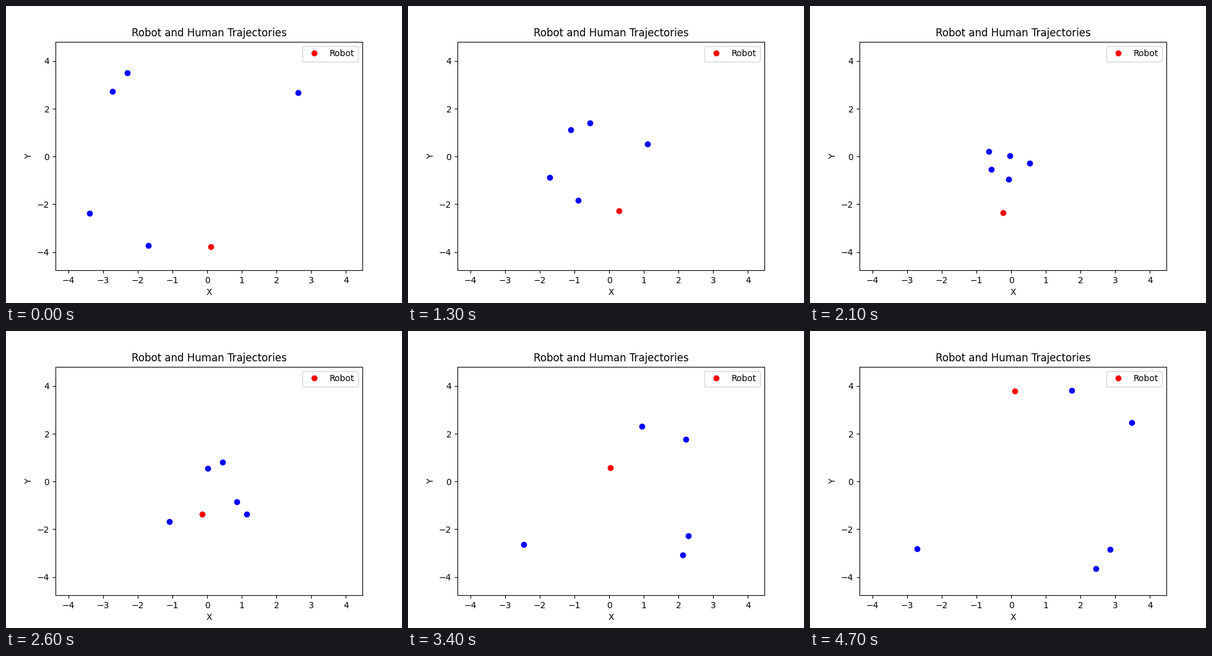
Animation of 640x480 px, one loop 4800 ms. Source, as a matplotlib script:

```python
import matplotlib.pyplot as plt
import numpy as np
from matplotlib.animation import FuncAnimation

FRAMES = 48
STEP = 0.25         # longest stride in one frame
NEAR, MEET = 8, 21  # frames at which humans pass their two key points

# Each human: a point on the way in, a point in the crowd, the goal.
# Everyone starts opposite the goal.
HUMANS = np.array([
    [(-1.235, 2.44), (0.53, -0.275), (2.445, -3.65)],
    [(-1.77, 1.82), (-0.03, 0.02), (2.86, -2.85)],
    [(1.83, 1.46), (-0.075, -0.95), (-2.72, -2.82)],
    [(-2.375, -1.545), (-0.645, 0.215), (3.51, 2.487)],
    [(-1.11, -2.635), (-0.57, -0.55), (1.768, 3.863)],
])

# The robot's turns: frame, x, y
ROBOT = [(0, 0.10, -3.765), (8, 0.78, -2.505), (13, 0.28, -2.27),
         (22, -0.29, -2.35), (30, 0.015, -0.407), (47, 0.10, 3.79)]


def walk(t, keys, points):
    """Position at time t on straight legs between points."""
    return np.array([np.interp(t, keys, axis) for axis in np.transpose(points)])


def human_at(n, near, meet, goal):
    """Walk into the crowd, then head for the goal and slow down near it."""
    pos = walk(n, (-1, NEAR, MEET), (-goal, near, meet))
    for _ in range(MEET, n):
        gap = goal - pos
        pos = pos + STEP * gap / max(1, np.hypot(*gap))
    return pos


fig, ax = plt.subplots(figsize=(6.4, 4.8), dpi=100)
ax.set(xlim=(-4.373, 4.477), ylim=(-4.765, 4.81), xlabel="X", ylabel="Y",
       title="Robot and Human Trajectories")
robot_dot, = ax.plot([], [], "ro", label="Robot")
human_dots, = ax.plot([], [], "bo")
ax.legend(loc="upper right")


def update(n):
    turns, *xy = np.transpose(ROBOT)
    robot_dot.set_data(*walk(n, turns, np.transpose(xy))[:, None])
    human_dots.set_data(*np.transpose([human_at(n, *h) for h in HUMANS]))
    return robot_dot, human_dots


anim = FuncAnimation(fig, update, frames=FRAMES, interval=100, repeat=True, repeat_delay=0)
plt.show()
```
